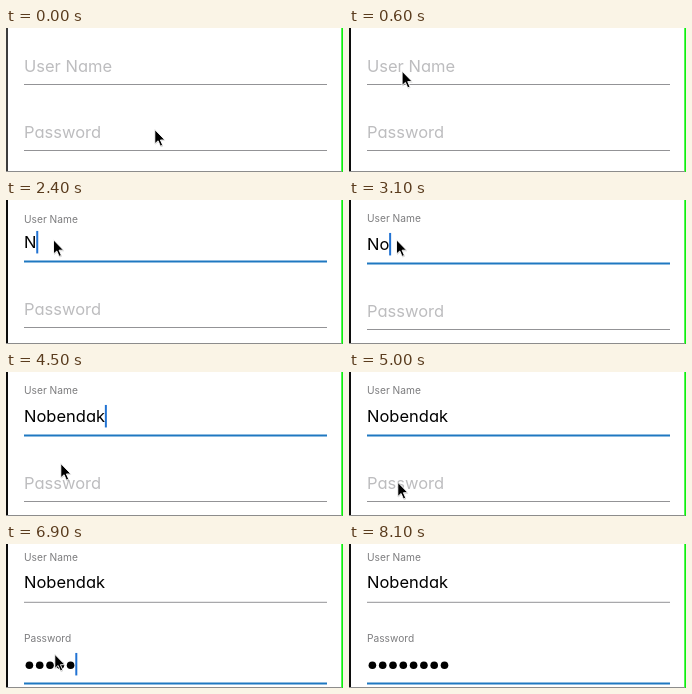
An HTML page for the animation above (8200 ms loop, 337 by 144 pixels).

```html
<!DOCTYPE html>
<html lang="en">
<head>
<meta charset="utf-8">
<title>Floating labels</title>
<style>
  html, body { margin: 0; width: 100%; height: 100%; overflow: hidden; background: #fff; }
  svg { display: block; width: 100vw; height: 100vh; }
  text { font: 400 16.5px Inter, sans-serif; font-feature-settings: "cv11"; }
  .hint { fill: #bdbdbf; }
  .label { fill: #7c7c7e; font-feature-settings: normal; }
</style>
</head>
<body>
<svg viewBox="0 0 337 144">
  <rect id="edge" width="2" height="144"/>
  <rect x="335.3" width="1.7" height="144" fill="#0cf00c"/>
  <rect y="143" width="336" height="1" fill="#8c8c8c"/>
  <text id="userLabel" x="18">User Name</text>
  <text id="userText" x="18"></text>
  <line id="userLine" x1="18" x2="321"/>
  <text id="passLabel" x="18">Password</text>
  <g id="dots"></g>
  <line id="passLine" x1="18" x2="321"/>
  <rect id="caret" width="2" fill="#2273d3"/>
  <g id="mouse" stroke-width=".9">
    <path d="M.5 .8V15L3.8 12L6.1 17.4L8.4 16.4L6.1 11.2H10.6Z" transform="translate(.5 1)" opacity=".18"/>
    <path d="M.5 .8V15L3.8 12L6.1 17.4L8.4 16.4L6.1 11.2H10.6Z" stroke="#fff"/>
  </g>
</svg>
<script>
const LOOP = 8200, STEP = 100;
const NAME = "Nobendak";
const HINT_SIZE = 16.5, LABEL_SIZE = 10.2, DOT_GAP = 10.3;
const BLUE = "#1f78c1", GREY = "#939396";

// Focus is the end of the label's rise; first and last are key presses
const user = { focus: 1200, first: 2300, last: 4100 };
const pass = { focus: 5300, first: 6000, last: 7400 };

const $ = id => document.getElementById(id);
const set = (el, attrs) => { for (const k in attrs) el.setAttribute(k, attrs[k]); };
const clamp = (v, lo, hi) => Math.min(hi, Math.max(lo, v));
const mix = (a, b, p) => a + (b - a) * p;
const ramp = (t, from, to) => clamp((t - from) / (to - from), 0, 1);
const ease = p => p * p * (3 - 2 * p);
const presses = (t, start, gap, max) => clamp(Math.floor((t - start) / gap) + 1, 0, max);

const dots = Array.from(NAME, (_, i) => {
  const dot = document.createElementNS("http://www.w3.org/2000/svg", "circle");
  set(dot, { cx: 23.4 + i * DOT_GAP, r: 3.8 });
  return $("dots").appendChild(dot);
});

function drawField(id, y, active, open, filled) {
  const label = $(id + "Label");
  set(label, { y: y - 12.7 - 22.5 * open - 6 * filled, class: open ? "label" : "hint" });
  label.style.fontSize = mix(HINT_SIZE, LABEL_SIZE, open) + "px";
  set($(id + "Line"), { y1: y, y2: y, stroke: active ? BLUE : GREY, "stroke-width": active ? 2 : 1 });
}

function drawCaret(t, field, y, width, filled) {
  const height = filled ? 22.5 : 17;
  const idle = t - (t < field.first ? field.focus : field.last);
  set($("caret"), {
    x: 17.8 + width,
    y: y - (filled ? 19.3 : 16) - height / 2,
    height,
    opacity: t < field.focus - STEP ? 0 : 1 - ramp(idle, 400, 700)
  });
}

function drawMouse(t) {
  const go = ease(ramp(t, 0, 700)), back = ramp(t, 4400, 5000);
  const [x, y] = t < 4400
    ? [mix(148.3, 47, go), mix(100.8, 39, go)]
    : [mix(55.5, 48.3, back), mix(87, 109.5, back)];
  const shown = t < 3500 || (t >= 4500 && t < 7700);
  set($("mouse"), { transform: `translate(${x} ${y})`, opacity: +shown });
}

function draw(t) {
  const userOpen = ramp(t, 1000, 1200), userFilled = ramp(t, 2200, 2600);
  const passOpen = ramp(t, 5100, 5300), passFilled = ramp(t, 5900, 6000);
  const inPass = t >= 5200, inUser = t >= 1100 && !inPass;

  // The form is centred, so a growing field pushes the others apart
  const push = 3 * userOpen + 4 * userFilled;
  const userY = 56.5 + push - 3 * passOpen - 2.2 * passFilled;
  const passY = 122.5 + push + 6.5 * passOpen + 3.5 * passFilled;

  set($("edge"), { fill: t < STEP ? "#3c3c3c" : "#0c0c0c" });
  drawField("user", userY, inUser, userOpen, userFilled);
  drawField("pass", passY, inPass, passOpen, passFilled);

  const letters = presses(t, user.first, 200, 2) + presses(t, 3200, 180, 6);
  const count = presses(t, pass.first, 200, dots.length);
  const text = $("userText");
  text.textContent = NAME.slice(0, letters);
  set(text, { y: userY - 13.9 });
  dots.forEach((dot, i) => set(dot, { cy: passY - 18.3, visibility: i < count ? "visible" : "hidden" }));

  if (inPass) drawCaret(t, pass, passY, count * DOT_GAP, count);
  else drawCaret(t, user, userY, letters && text.getComputedTextLength(), letters);
  drawMouse(t);
}

const start = performance.now();
function tick() {
  const t = (performance.now() - start) % LOOP;
  draw(Math.floor(t / STEP) * STEP);
  requestAnimationFrame(tick);
}
tick();
</script>
</body>
</html>
```
